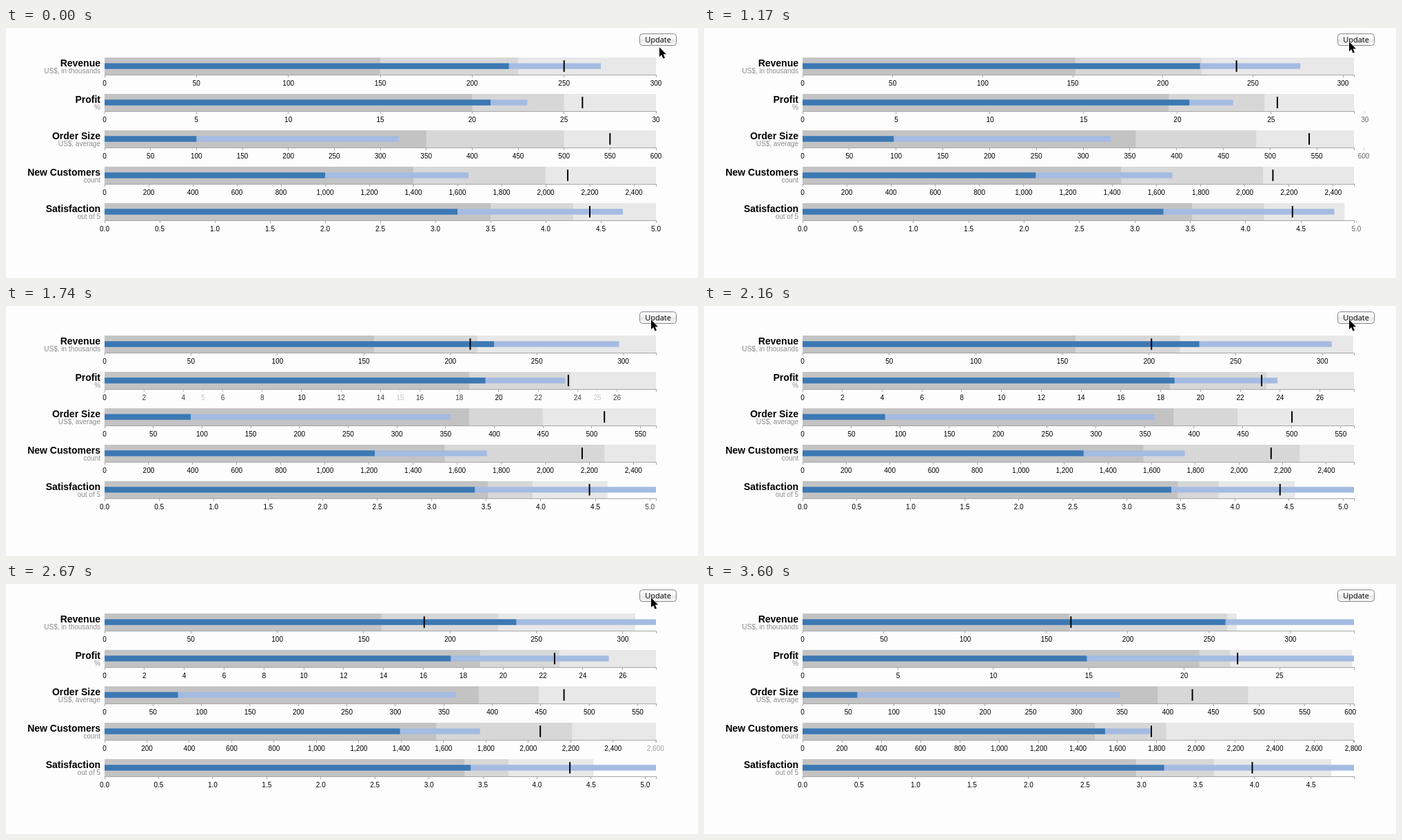
An HTML page for the animation above (3810 ms loop, 1004x364 px).

```html
<!DOCTYPE html>
<html lang="en">
<head>
<meta charset="utf-8">
<title>Bullet charts</title>
<style>
  html, body { margin: 0; width: 100%; height: 100%; overflow: hidden; background: #fdfdfd; }
  svg { display: block; font: 10px "Liberation Sans", Arial, sans-serif; }
  .title { font-size: 14px; font-weight: bold; text-anchor: end; }
  .subtitle { fill: #8c8c8c; text-anchor: end; }
  .tick text { text-anchor: middle; }
  .axis { fill: none; stroke: #a6a6a6; shape-rendering: crispEdges; }
  .marker { stroke: #000; stroke-width: 2; }
  .button { font: 11px "Open Sans", sans-serif; text-anchor: middle; }
</style>
</head>
<body>
<svg width="1004" height="364" viewBox="0 0 1004 364">
  <defs>
    <linearGradient id="idle" x2="0" y2="1">
      <stop stop-color="#fff"/><stop offset=".5" stop-color="#f3f3f3"/>
      <stop offset=".51" stop-color="#e8e8e8"/><stop offset="1" stop-color="#f8f8f8"/>
    </linearGradient>
    <linearGradient id="pressed" x2="0" y2="1">
      <stop stop-color="#b4cdec"/><stop offset=".5" stop-color="#7eaee2"/>
      <stop offset=".51" stop-color="#5a99da"/><stop offset="1" stop-color="#9ccbf2"/>
    </linearGradient>
    <clipPath id="chartArea"><rect x="23" width="960" height="364"/></clipPath>
  </defs>
  <g id="charts" clip-path="url(#chartArea)"></g>
  <g class="button">
    <rect id="button" x="919.5" y="8.5" width="53" height="17" rx="4" stroke="#858585"/>
    <text x="946" y="21">Update</text>
  </g>
  <path id="cursor" d="M0 0V14L3.2 11 5.5 16.5 8 15.4 5.7 10.2H10Z" stroke="#fff" paint-order="stroke"/>
</svg>
<script>
const LOOP = 3810, FRAME = 30, DURATION = 450, PRESS = 60;
const FIRST_CLICK = 960, CLICK_INTERVAL = 503, CLICK_COUNT = 5;
const LEFT = 143, WIDTH = 800, TOP = 43, ROW = 53, HEIGHT = 25;
const BAR_COLORS = ["#c3c3c3", "#d7d7d7", "#e8e8e8", "#3c78b2", "#a4bbe2"];

// Key poses hold three ranges, two measures and one marker.
const charts = [
  { title: "Revenue", subtitle: "US$, in thousands",
    first: [150, 225, 300, 220, 270, 250],
    middle: [158, 218, 318, 230, 308, 198],
    last: [164, 261, 267, 260, 339, 165] },
  { title: "Profit", subtitle: "%",
    first: [20, 25, 30, 21, 23, 26],
    middle: [18.4, 23.2, 27.6, 18.5, 24, 22.9],
    last: [20.8, 22.4, 28.8, 14.9, 28.9, 22.8] },
  { title: "Order Size", subtitle: "US$, average",
    first: [350, 500, 600, 100, 320, 550],
    middle: [381, 442, 562, 83, 362, 496],
    last: [389, 488, 604, 60, 348, 427] },
  { title: "New Customers", subtitle: "count",
    first: [1400, 2000, 2500, 1000, 1650, 2100],
    middle: [1570, 2287, 2533, 1309, 1758, 2143],
    last: [1486, 1848, 2803, 1538, 1773, 1773] },
  { title: "Satisfaction", subtitle: "out of 5", decimals: 1,
    first: [3.5, 4.25, 5, 3.2, 4.7, 4.4],
    middle: [3.46, 3.82, 4.53, 3.42, 5.12, 4.41],
    last: [2.95, 3.64, 4.68, 3.2, 4.88, 3.98] }
];

const $ = id => document.getElementById(id);
const lerp = (a, b, k) => a + (b - a) * k;
const clamp01 = x => Math.min(1, Math.max(0, x));
const cubicInOut = x => x < .5 ? 4 * x ** 3 : 1 - 4 * (1 - x) ** 3;

// Values after a number of clicks, on a parabola through the key poses.
function pose({ first, middle, last }, clicks) {
  const u = clicks / CLICK_COUNT;
  return first.map((a, i) => {
    const bow = middle[i] - (a + last[i]) / 2;
    return lerp(a, last[i], u) + 4 * u * (1 - u) * bow;
  });
}

// Round tick values, about ten per axis.
function ticks(max) {
  const power = 10 ** Math.floor(Math.log10(max / 10));
  const ratio = 10 * power / max;
  const step = power * (ratio <= .15 ? 10 : ratio <= .35 ? 5 : ratio <= .75 ? 2 : 1);
  return Array.from({ length: Math.floor(max / step + 1e-6) + 1 }, (_, i) => i * step);
}

function axisMarkup(maxA, maxB, k, decimals = 0) {
  const before = ticks(maxA), after = ticks(maxB);
  const format = { minimumFractionDigits: decimals, maximumFractionDigits: decimals };
  let out = `<path class="axis" d="M0 29V25H${WIDTH}V29"/>`;
  for (const value of new Set([...before, ...after])) {
    const opacity = !before.includes(value) ? k : !after.includes(value) ? 1 - k : 1;
    if (opacity < .01) continue;
    const x = value * lerp(WIDTH / maxA, WIDTH / maxB, k);
    out += `<g class="tick" transform="translate(${x})" opacity="${opacity}">
      <path class="axis" d="M0 25V29"/>
      <text y="40.8">${value.toLocaleString("en-US", format)}</text></g>`;
  }
  return out;
}

function chartMarkup(chart, row, clicks, k) {
  const a = pose(chart, Math.max(0, clicks - 1)), b = pose(chart, clicks);
  const maxA = Math.max(...a), maxB = Math.max(...b);
  const px = a.map((value, i) => lerp(value / maxA, b[i] / maxB, k) * WIDTH);
  const bar = i => {
    const [y, h] = i < 3 ? [0, HEIGHT] : [HEIGHT / 3, HEIGHT / 3];
    return `<rect y="${y}" width="${px[i]}" height="${h}" fill="${BAR_COLORS[i]}"/>`;
  };
  return `<g transform="translate(${LEFT} ${TOP + row * ROW})">
    ${[2, 1, 0, 4, 3].map(bar).join("")}
    <path class="marker" d="M${px[5]} ${HEIGHT / 6}V${HEIGHT * 5 / 6}"/>
    <text class="title" x="-6" y="12.5">${chart.title}</text>
    <text class="subtitle" x="-6" y="22.5">${chart.subtitle}</text>
    ${axisMarkup(maxA, maxB, k, chart.decimals)}</g>`;
}

function render(t) {
  const clickTime = n => FIRST_CLICK + (n - 1) * CLICK_INTERVAL;
  const begun = Math.floor((t - FIRST_CLICK) / CLICK_INTERVAL) + 1;
  const clicks = Math.min(CLICK_COUNT, Math.max(0, begun));
  const k = cubicInOut(clamp01((t - clickTime(clicks)) / DURATION));
  $("charts").innerHTML = charts.map((chart, row) => chartMarkup(chart, row, clicks, k)).join("");

  const pressed = clicks < CLICK_COUNT && t >= clickTime(clicks + 1) - PRESS;
  $("button").setAttribute("fill", `url(#${pressed ? "pressed" : "idle"})`);

  const arrive = cubicInOut(clamp01(t / 330));
  const leave = clamp01((t - 3420) / 150) ** 2;
  const x = lerp(948, 936, arrive) + 24 * leave;
  const y = lerp(28, 20, arrive) - 17 * leave;
  $("cursor").setAttribute("transform", `translate(${x} ${y})`);
  $("cursor").setAttribute("visibility", t < 3600 ? "visible" : "hidden");
}

let shown = -1;
const origin = performance.now();
function loop() {
  const elapsed = (performance.now() - origin) % LOOP;
  const t = Math.floor(elapsed / FRAME) * FRAME;
  if (t !== shown) render(shown = t);
  requestAnimationFrame(loop);
}
loop();
</script>
</body>
</html>
```
